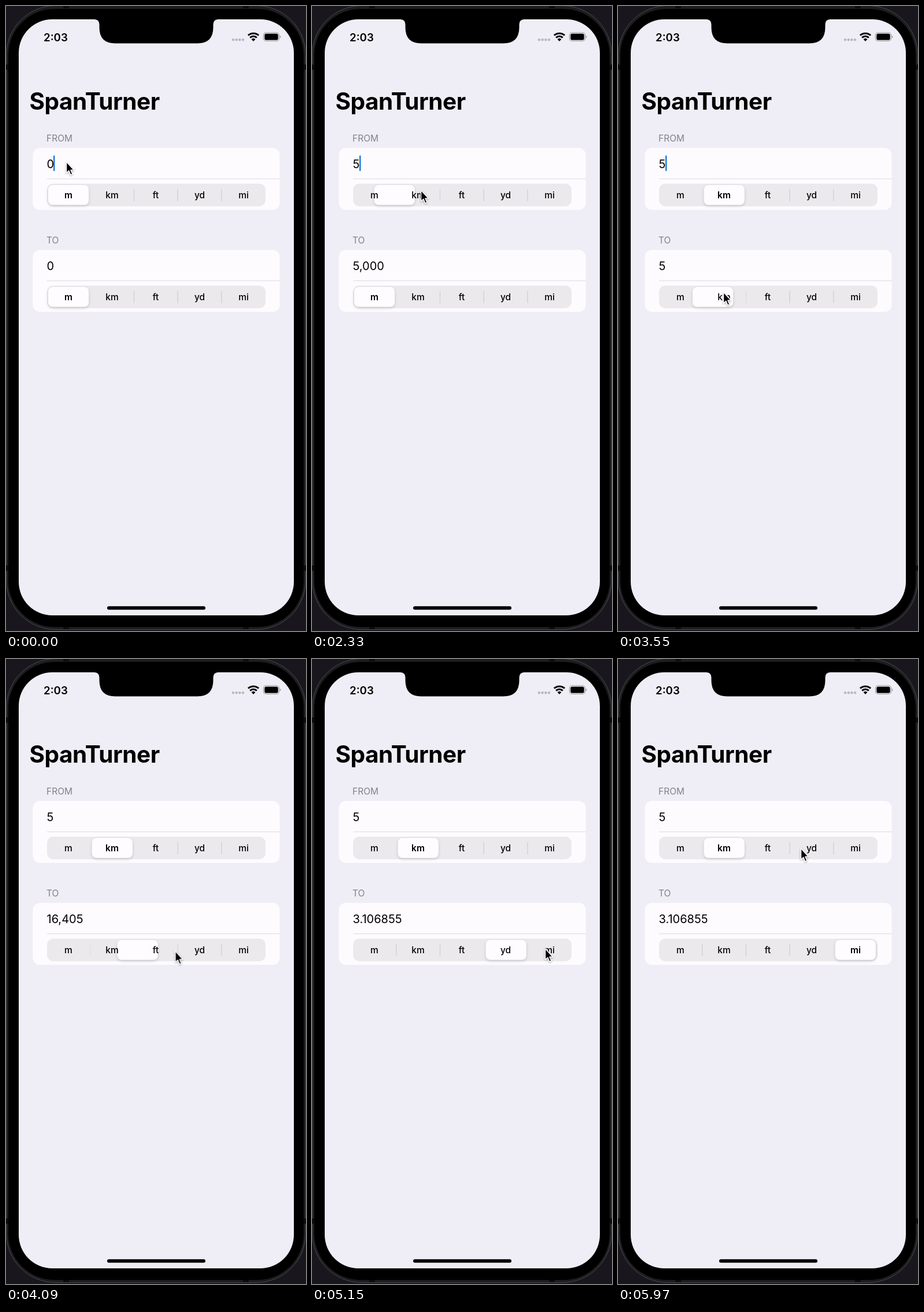
Animation of 519 by 1079 pixels, one loop 6 s. Source, as an HTML page:

```html
<!DOCTYPE html>
<html lang="en">
<head>
<meta charset="utf-8">
<title>Length converter</title>
<style>
html, body { margin: 0; width: 100%; height: 100%; overflow: hidden; background: #19161d; }
svg { display: block; width: 519px; height: 1079px; font-family: Inter, sans-serif; }

.title { font-size: 40.5px; font-weight: 700; letter-spacing: -.5px; }
.clock { font-size: 18.7px; font-weight: 600; }
.head { font-size: 15.5px; fill: #838187; }
.value { font-size: 20px; }
.label { font-size: 15.5px; font-weight: 500; text-anchor: middle; }
.card { fill: #fdfbfe; }
.track { fill: #ebe9ec; }
.line { stroke: #dcdade; }
.divs { stroke: #d0ced3; stroke-width: 1.3; }
.thumb { fill: #fefcff; filter: drop-shadow(0 2px 2.5px rgba(0,0,0,.17)); }

/* one loop for everything that moves */
.a { animation: 6s linear infinite; }
.s { animation: 6s step-end infinite; }

#mouse { animation-name: mouse; animation-timing-function: ease-in-out; }
@keyframes mouse {
  0%, 15.7% { transform: translate(104px, 269px); }
  20%, 23.7% { transform: translate(108px, 269px); }
  29.3%, 39.3% { transform: translate(188px, 318px); }
  43% { transform: translate(261px, 390px); }
  49% { transform: translate(215px, 504px); }
  53.4%, 59.2% { transform: translate(182px, 494px); }
  63.1%, 66.5% { transform: translate(274px, 505px); }
  71.6%, 78.5% { transform: translate(355px, 502px); }
  82.8%, 86.5% { transform: translate(403px, 500px); animation-timing-function: ease-in; }
  90.83% { transform: translate(396px, 427px); animation-timing-function: ease-out; }
  95.5%, 96% { transform: translate(324px, 251px); }
  99.5%, 100% { transform: translate(316px, 327px); }
}

#caret { animation-name: blink; }
@keyframes blink {
  0%, .8% { opacity: 1; }
  2%, 9.4% { opacity: 0; }
  12.2%, 24.3% { opacity: 1; }
  26.3%, 33.3% { opacity: 0; }
  35.5%, 42.3% { opacity: 1; }
  44.3%, 51.3% { opacity: 0; }
  53.4%, 60.3% { opacity: 1; }
  62.3%, 69.3% { opacity: 0; }
  71.5%, 78.5% { opacity: 1; }
  80.3%, 87.3% { opacity: 0; }
  89.5%, 96.3% { opacity: 1; }
  98.3%, 100% { opacity: 0; }
}
#caret-pos { animation-name: caret-pos; }
@keyframes caret-pos { 15.67% { transform: translateX(-11px); } 0%, 19.17%, 100% { transform: none; } }

/* sliding selections */
#thumb1 { animation-name: thumb1; animation-timing-function: ease; }
#thumb2 { animation-name: thumb2; animation-timing-function: ease; }
@keyframes thumb1 {
  0%, 37.08% { transform: none; }
  43.58%, 100% { transform: translateX(75.7px); }
}
@keyframes thumb2 {
  0%, 56.3% { transform: none; }
  62.8%, 66% { transform: translateX(75.7px); }
  72.5%, 75.75% { transform: translateX(151.4px); }
  82.25%, 85.75% { transform: translateX(227.1px); }
  92.25%, 100% { transform: translateX(302.8px); }
}

/* dividers next to a selection are hidden */
@keyframes div-from-2 { 0%, 37.08% { opacity: 1; } 43.58%, 100% { opacity: 0; } }
@keyframes div-to-1 { 0%, 66% { opacity: 0; } 72.5%, 100% { opacity: 1; } }
@keyframes div-to-2 { 0%, 56.3% { opacity: 1; } 62.8%, 75.75% { opacity: 0; } 82.25%, 100% { opacity: 1; } }
@keyframes div-to-3 { 0%, 66% { opacity: 1; } 72.5%, 85.75% { opacity: 0; } 92.25%, 100% { opacity: 1; } }
@keyframes div-to-4 { 0%, 75.75% { opacity: 1; } 82.25%, 100% { opacity: 0; } }

/* bold label while selected */
@keyframes bold-from-m { 0% { font-weight: 600; } 37.08%, 100% { font-weight: 500; } }
@keyframes bold-from-km { 0% { font-weight: 500; } 43.58%, 100% { font-weight: 600; } }
@keyframes bold-to-m { 0% { font-weight: 600; } 56.3%, 100% { font-weight: 500; } }
@keyframes bold-to-km { 0%, 66%, 100% { font-weight: 500; } 62.8% { font-weight: 600; } }
@keyframes bold-to-ft { 0%, 75.75%, 100% { font-weight: 500; } 72.5% { font-weight: 600; } }
@keyframes bold-to-yd { 0%, 85.75%, 100% { font-weight: 500; } 82.25% { font-weight: 600; } }
@keyframes bold-to-mi { 0% { font-weight: 500; } 92.25%, 100% { font-weight: 600; } }

/* field contents */
@keyframes from-0 { 0% { opacity: 1; } 15.67%, 100% { opacity: 0; } }
@keyframes from-5 { 0% { opacity: 0; } 19.17%, 100% { opacity: 1; } }
@keyframes to-0 { 0% { opacity: 1; } 19.17%, 100% { opacity: 0; } }
@keyframes to-5 { 0%, 37.08%, 66%, 100% { opacity: 0; } 19.17%, 56.3% { opacity: 1; } }
@keyframes to-m { 0%, 56.3%, 100% { opacity: 0; } 37.08% { opacity: 1; } }
@keyframes to-ft { 0%, 75.75%, 100% { opacity: 0; } 66% { opacity: 1; } }
@keyframes to-yd { 0%, 85.75%, 100% { opacity: 0; } 75.75% { opacity: 1; } }
@keyframes to-mi { 0% { opacity: 0; } 85.75%, 100% { opacity: 1; } }
</style>
</head>
<body>
<svg viewBox="0 0 519 1079">
  <defs>
    <g id="panel">
      <rect class="card" x="46.5" y="245" width="427" height="107" rx="12"/>
      <path class="line" d="M71 298.3H473.5"/>
      <rect class="track" x="71" y="306.7" width="378" height="39" rx="10.5"/>
    </g>
    <rect id="pill" x="72.9" y="309" width="70.2" height="34.6" rx="8"/>
  </defs>

  <!-- phone body -->
  <rect x=".5" y="-.5" width="518" height="1077" rx="85" fill="#1d1d1f" stroke="#4a4a4d"/>
  <path d="M99 2H109M410 2H420M2 101V110M517 101V110M2 966V975M517 966V975M99 1074H109M410 1074H420" stroke="#0c0c0e" stroke-width="4"/>
  <rect x="4" y="5" width="511" height="1067" rx="80"/>
  <rect x="22" y="23" width="476" height="1029" rx="58" fill="#efeef6"/>
  <path d="M153 22V23Q161.500 23.500 161.500 32V37Q161.500 64.500 189 64.500H331Q358.500 64.500 358.500 37V32Q358.500 23.500 367 23V22Z"/>
  <rect x="175" y="1036.300" width="170" height="6" rx="3"/>

  <!-- status bar -->
  <text class="clock" x="65" y="60.500">2:03</text>
  <g fill="#b9b7be">
    <circle cx="393" cy="58.300" r="2.200"/><circle cx="398.700" cy="58.300" r="2.200"/>
    <circle cx="404.300" cy="58.300" r="2.200"/><circle cx="410" cy="58.300" r="2.200"/>
  </g>
  <g fill="none" stroke="#000" stroke-width="3">
    <path d="M418.900 50.700A13.500 13.500 0 0 1 437.100 50.700"/>
    <path d="M422.200 54.600A8.500 8.500 0 0 1 433.800 54.600"/>
  </g>
  <path d="M428 61L424.600 57.400A5 5 0 0 1 431.400 57.400Z"/>
  <rect x="445.500" y="46" width="27" height="14.500" rx="4.500" fill="none" stroke="#98969c" stroke-width="1.200"/>
  <rect x="447.300" y="47.800" width="23.400" height="10.900" rx="2.800"/>
  <path d="M474 50.800Q477 53.200 474 55.700Z" fill="#98969c"/>

  <text class="title" x="40.500" y="178.500">SpanTurner</text>

  <!-- upper section -->
  <text class="head" x="70" y="233.700">FROM</text>
  <use href="#panel"/>
  <g class="divs">
    <path class="a" style="animation-name:div-from-2" d="M221.500 316V337"/>
    <path d="M297.200 316V337M372.900 316V337"/>
  </g>
  <g id="thumb1" class="a"><use href="#pill" class="thumb"/></g>
  <g class="label">
    <text class="s" style="animation-name:bold-from-m" x="108" y="332">m</text>
    <text class="s" style="animation-name:bold-from-km" x="183.500" y="332">km</text>
    <text x="259" y="332">ft</text>
    <text x="335" y="332">yd</text>
    <text x="411" y="332">mi</text>
  </g>
  <g class="value">
    <text class="s" style="animation-name:from-0" x="70.500" y="279.500">0</text>
    <text class="s" style="animation-name:from-5" x="70.500" y="279.500">5</text>
  </g>
  <g id="caret-pos" class="s">
    <rect id="caret" class="a" x="82" y="258" width="2.400" height="27" rx="1" fill="#1878dc"/>
  </g>

  <!-- lower section -->
  <text class="head" x="70" y="409.700">TO</text>
  <g transform="translate(0 176)">
    <use href="#panel"/>
    <g class="divs">
      <path class="a" style="animation-name:div-to-1" d="M145.800 316V337"/>
      <path class="a" style="animation-name:div-to-2" d="M221.500 316V337"/>
      <path class="a" style="animation-name:div-to-3" d="M297.200 316V337"/>
      <path class="a" style="animation-name:div-to-4" d="M372.900 316V337"/>
    </g>
    <g id="thumb2" class="a"><use href="#pill" class="thumb"/></g>
    <g class="label">
      <text class="s" style="animation-name:bold-to-m" x="108" y="332">m</text>
      <text class="s" style="animation-name:bold-to-km" x="183.500" y="332">km</text>
      <text class="s" style="animation-name:bold-to-ft" x="259" y="332">ft</text>
      <text class="s" style="animation-name:bold-to-yd" x="335" y="332">yd</text>
      <text class="s" style="animation-name:bold-to-mi" x="411" y="332">mi</text>
    </g>
    <g class="value">
      <text class="s" style="animation-name:to-0" x="70.500" y="279.500">0</text>
      <text class="s" style="animation-name:to-5" x="70.500" y="279.500">5</text>
      <text class="s" style="animation-name:to-m" x="70.500" y="279.500">5,000</text>
      <text class="s" style="animation-name:to-ft" x="70.500" y="279.500">16,405</text>
      <text class="s" style="animation-name:to-yd" x="70.500" y="279.500">5,470</text>
      <text class="s" style="animation-name:to-mi" x="70.500" y="279.500">3.106855</text>
    </g>
  </g>

  <g id="mouse" class="a">
    <path d="M.5 0V19.300L4.800 15.400L7.800 22.600L11 21.200L8 14.200H13.600Z" stroke="#fff" stroke-width="1.500" stroke-linejoin="round" style="filter:drop-shadow(0 1.500px 1.500px rgba(0,0,0,.35))"/>
  </g>
</svg>
</body>
</html>
```
